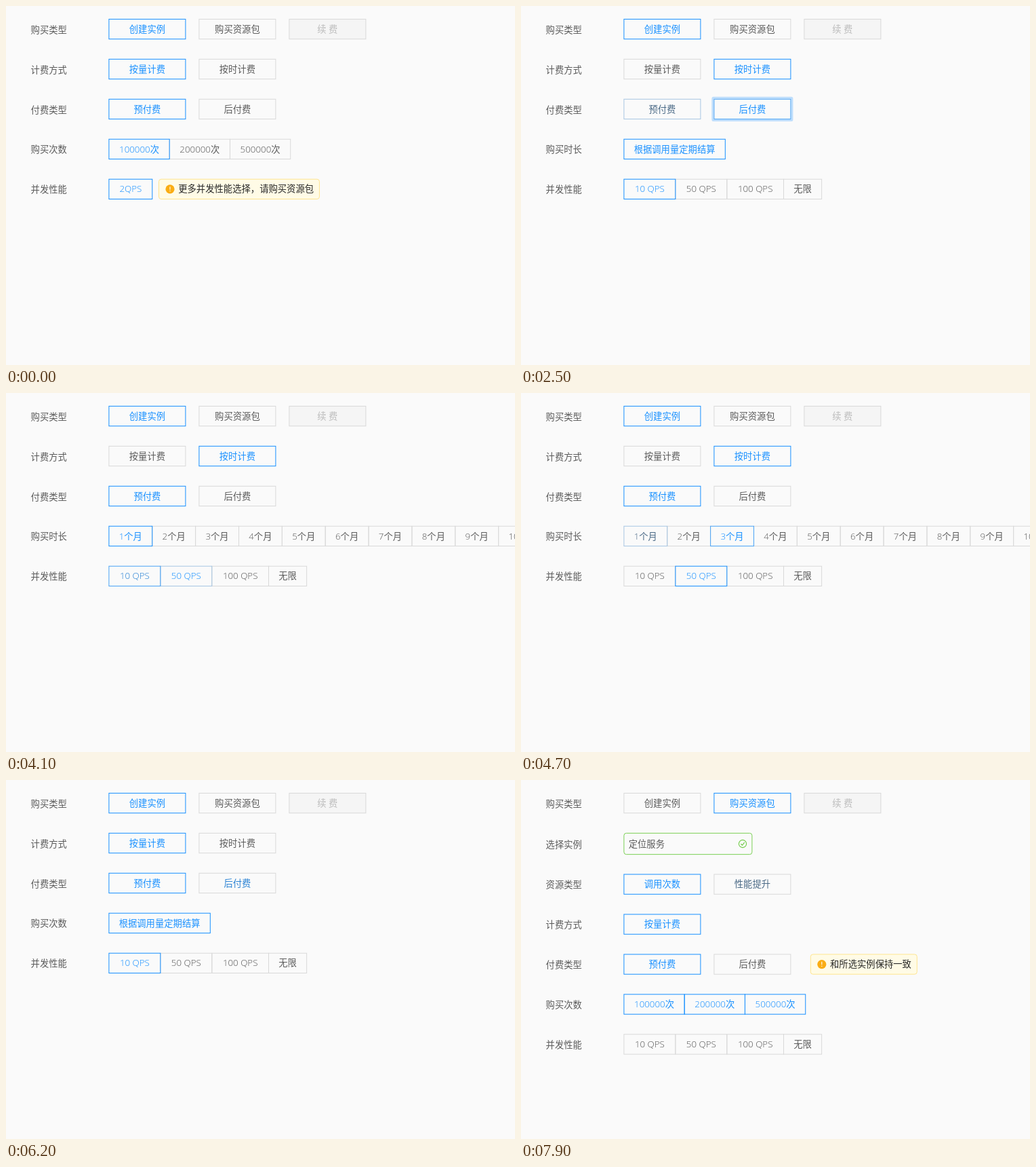
An HTML page for the animation above (8000 ms loop, 751 by 529 pixels).

```html
<!DOCTYPE html>
<html lang="zh-CN">
<head>
<meta charset="utf-8">
<title>购买表单</title>
<style>
html, body { margin: 0; width: 100%; height: 100%; overflow: hidden; background: #fafafa; }
svg { display: block; width: 751px; height: 529px; }
text { font: 350 13.33px "Open Sans", "Noto Sans CJK SC", "Noto Sans CJK", sans-serif; white-space: pre; }
</style>
</head>
<body>
<svg id="stage" viewBox="0 0 751 529"></svg>
<script>
const LOOP = 8000, STEP = 100, LOADED = 7200;
const INK = [90, 90, 90], LINE = [217, 217, 217], BLUE = [24, 144, 255];
const LEFT = 151.4, W = 114, H = 30.3, EM = 13.33;
const col = i => LEFT + 133 * i;
const row = (i, top = 18.9) => top + 58.95 * i;
const packRow = i => row(i, 138.5);

// the pointer's visits: time over, time of click, group, item
const VISITS = [
  [1100, 1600, 'bill', 1],
  [2100, 2300, 'pay', 1],
  [3300, 3300, 'pay', 0],
  [3600, 4000, 'qps', 1],
  [4300, 4500, 'amount', 2],
  [5000, 5500, 'bill', 0],
  [6000, 6200, 'pay', 1],
  [6500, 6900, 'kind', 1],
  [7800, Infinity, 'resource', 1]
].map(([over, hit, key, item]) => ({ over, hit, key, item }));

const MONTHS = Array.from({ length: 12 }, (_, i) => `${i + 1}个月`);
const COUNTS = [1, 2, 5].map(n => `${n}00000次`);
const QPS = ['10 QPS', '50 QPS', '100 QPS', '无限'];

const lastHit = (t, test) => VISITS.filter(v => v.hit <= t && test(v)).pop();

// a new billing or payment choice rebuilds the rows below it
const rebuilt = t => (lastHit(t, v => v.key === 'bill' || v.key === 'pay') || { hit: 0 }).hit;

function picked(key, t) {
  const lower = key === 'amount' || key === 'qps';
  const v = lastHit(t, v => v.key === key && (!lower || v.hit > rebuilt(t)));
  return v ? v.item : 0;
}

function hovered(key, item, t) {
  const v = VISITS.filter(v => v.over <= t).pop();
  return !!v && v.key === key && v.item === item;
}

// a 300 ms ease-in-out between off and on
function fade(on, t, from = 0) {
  const k = [1, 2, 3].reduce((sum, n) => sum + on(Math.max(t - n * STEP, from)), 0) / 3;
  return k * k * (3 - 2 * k);
}

function look(key, item, t, from) {
  const on = u => picked(key, u) === item;
  return {
    text: fade(u => on(u) || hovered(key, item, u), t, from),
    line: fade(on, t, from)
  };
}

function pulse(key, item, t) {
  const v = lastHit(t, v => v.key === key && v.item === item);
  return v ? Math.sin(Math.PI * Math.min((t - v.hit) / 500, 1)) : 0;
}

const mix = (a, b, k) => `rgb(${a.map((v, i) => Math.round(v + (b[i] - v) * k))})`;
const ink = k => mix(INK, BLUE, k);
const line = k => mix(LINE, BLUE, k);
const base = y => Math.round(y + 19.77);

const text = (x, y, s, fill, anchor = 'start') =>
  `<text x="${x}" y="${y}" fill="${fill}" text-anchor="${anchor}">${s}</text>`;
const rect = (x, y, w, h, stroke, fill = 'none', r = 0, sw = 1) =>
  `<rect x="${x}" y="${y}" width="${w}" height="${h}" rx="${r}" fill="${fill}" stroke="${stroke}" stroke-width="${sw}"/>`;
const box = (x, y, w, stroke, fill, r, h = H) => rect(x + .5, y + .5, w - 1, h - 1, stroke, fill, r);
const label = (y, s) => text(36.6, Math.round(y + 20.7), s, ink(0));

const advance = s => [...s].reduce((sum, c) =>
  sum + (c === ' ' ? 4.3 : /\d/.test(c) ? 7.75 : /[A-Z]/.test(c) ? 8.9 : EM), 0);

const glow = (x, y, k) =>
  rect(x - 1.5, y - 1.5, W + 3, H + 3, `rgba(24,144,255,${.28 * k})`, 'none', 1, 3);

const button = (x, y, s, k) =>
  box(x, y, W, line(k.line)) + text(x + W / 2, base(y), s, ink(k.text), 'middle');

const choice = (y, names, key, t) =>
  names.map((s, i) => button(col(i), y, s, look(key, i, t))).join('');

// joined cells; the bluest border is drawn last
function group(y, names, state) {
  let x = LEFT + .5;
  return names.map((s, i) => {
    const k = state(i), w = advance(s) + 29.45;
    const svg = rect(x, y + .5, w, H - 1, line(k.line)) +
      text(x + w / 2, base(y), s, ink(k.text), 'middle');
    x += w;
    return { k, svg };
  }).sort((a, b) => a.k.line - b.k.line).map(c => c.svg).join('');
}

function notice(x, y, s) {
  const cx = x + 17, cy = y + H / 2;
  return box(x, y, advance(s) + 38, '#ffe58f', '#fffbe6', 3.5) +
    `<circle cx="${cx}" cy="${cy}" r="6.6" fill="#faad14"/>` +
    `<path d="M${cx} ${cy - 3.7}v4.5m0 1.3v1.3" stroke="#fff" stroke-width="1.1"/>` +
    text(x + 29.2, base(y), s, '#262626');
}

const typeRow = t =>
  label(row(0), '购买类型') +
  choice(row(0), ['创建实例', '购买资源包'], 'kind', t) +
  box(col(2), row(0), W, line(0), '#f5f5f5') +
  text(col(2) + W / 2, base(row(0)), '续 费', '#bcbcbc', 'middle');

function createForm(t) {
  const timed = picked('bill', t) === 1, settled = picked('pay', t) === 1;
  const amounts = settled ? ['根据调用量定期结算'] : timed ? MONTHS : COUNTS;
  const limited = !timed && !settled;
  const cells = key => i => look(key, i, t, rebuilt(t));
  return label(row(1), '计费方式') +
    choice(row(1), ['按量计费', '按时计费'], 'bill', t) +
    label(row(2), '付费类型') +
    [0, 1].map(i => glow(col(i), row(2), pulse('pay', i, t))).join('') +
    choice(row(2), ['预付费', '后付费'], 'pay', t) +
    label(row(3), timed ? '购买时长' : '购买次数') +
    group(row(3), amounts, cells('amount')) +
    label(row(4), '并发性能') +
    group(row(4), limited ? ['2QPS'] : QPS, cells('qps')) +
    (limited ? notice(225, row(4), '更多并发性能选择，请购买资源包') : '');
}

function packForm(t) {
  const loaded = t >= LOADED, blue = { text: 1, line: 1 }, plain = { text: 0, line: 0 };
  const select = text(36.6, 100, '选择实例', ink(0)) +
    box(LEFT, row(1), 190, loaded ? '#7bd054' : line(0), 'none', 3.5, 32.3);
  if (!loaded) return select;
  return select + text(158.7, 99, '定位服务', ink(0)) +
    '<g fill="none" stroke="#6fcb45" stroke-width="1.1"><circle cx="327" cy="94" r="5.6"/>' +
    '<path d="M324.4 94l2 2.1 3.4-4.2"/></g>' +
    ['资源类型', '计费方式', '付费类型', '购买次数', '并发性能'].map((s, i) => label(packRow(i), s)).join('') +
    choice(packRow(0), ['调用次数', '性能提升'], 'resource', t) +
    button(col(0), packRow(1), '按量计费', blue) +
    button(col(0), packRow(2), '预付费', blue) +
    button(col(1), packRow(2), '后付费', plain) +
    notice(426.8, packRow(2), '和所选实例保持一致') +
    group(packRow(3), COUNTS, () => blue) +
    group(packRow(4), QPS, () => plain);
}

const stage = document.getElementById('stage');
const start = performance.now();
let shown = -1;

function draw() {
  const now = Math.max(0, performance.now() - start) % LOOP;
  const t = Math.floor(now / STEP) * STEP;
  if (t !== shown) {
    shown = t;
    stage.innerHTML = typeRow(t) + (picked('kind', t) ? packForm(t) : createForm(t));
  }
  requestAnimationFrame(draw);
}
draw();
</script>
</body>
</html>
```
